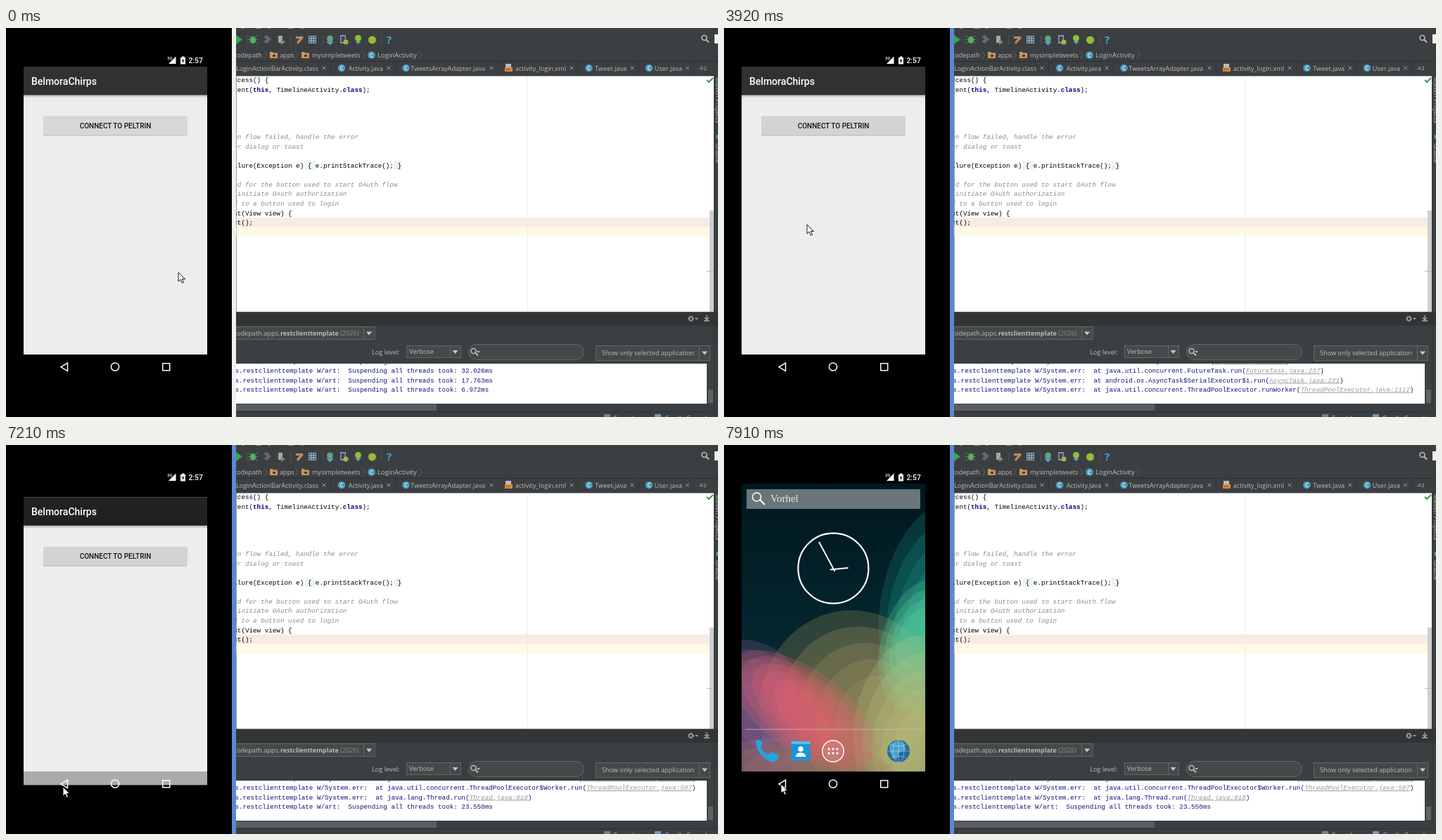
Write an HTML page that moves like this. It is 1012 by 554 pixels and loops after 8 s.

```html
<!DOCTYPE html>
<html lang="en">
<head>
<meta charset="utf-8">
<title>Phone and editor</title>
<style>
  html, body { margin: 0; width: 100%; height: 100%; overflow: hidden; background: #000; }
  svg { display: block; width: 1012px; height: 554px; }
  text { white-space: pre; }
  .ui { font: 9.2px "Open Sans", sans-serif; fill: #bbb; }
  .mono { font: 9.25px "Liberation Mono", monospace; }
  .note { font-style: italic; fill: #8c8c8c; }
  .key { font-weight: bold; fill: #000080; }
  .log { fill: #12127e; }
  .link { font-style: italic; fill: #999; text-decoration: underline; }
  .phone { font-family: Roboto, sans-serif; font-weight: 500; }
  .line { fill: none; stroke: #fff; }
</style>
</head>
<body>
<svg id="stage" viewBox="0 0 1012 554"></svg>
<script>
const rect = (x, y, w, h, fill, extra = '') =>
  `<rect x="${x}" y="${y}" width="${w}" height="${h}" fill="${fill}" ${extra}/>`;
const circle = (x, y, r, fill, extra = '') =>
  `<circle cx="${x}" cy="${y}" r="${r}" fill="${fill}" ${extra}/>`;
const path = (d, extra = '') => `<path d="${d}" ${extra}/>`;
const text = (x, y, s, cls = 'ui', extra = '') =>
  `<text x="${x}" y="${y}" class="${cls}" ${extra}>${s}</text>`;
const span = (cls, s) => `<tspan class="${cls}">${s}</tspan>`;
const repeat = (n, f) => Array.from({ length: n }, (_, i) => f(i)).join('');

// Editor window
const classIcon = (x, y) => circle(x, y, 5.3, '#4a9cc0') +
  text(x, y + 3, 'C', 'ui', 'text-anchor="middle" style="font-size:8px;font-weight:600;fill:#e8f4fa"');
const folder = x => path(`M${x} 34h4l1 1.5h6v7.500h-11z`, 'fill="#c9975a"') + rect(x + 4, 38, 4, 3, '#4f3d2a');
const chevron = x => path(`M${x} 33l4 5.500l-4 5.500`, 'fill="none" stroke="#5d6062"');
const close = x => path(`M${x - 2.5} 54.500l5 5m0 -5l-5 5`, 'stroke="#9a9c9d"');
const arrow = (x, y) => path(`M${x - 4} ${y - 2}h8l-4 5z`, 'fill="#c8c8c8"');
const lens = (x, y) => circle(x, y, 3.5, 'none', 'stroke="#bbb" stroke-width="1.6"') +
  path(`M${x + 2.5} ${y + 2.5}l4 4`, 'stroke="#bbb" stroke-width="2"');
const box = (x, y, w, h, r = 0) => rect(x, y, w, h, '#45494a', `stroke="#646769" rx="${r}"`);

const toolbar = () =>
  path('M327 10l9 6.500l-9 6.500z', 'fill="#34a853"') +
  path('M345 11l12 11m0-11l-12 11m-1-5.500h14', 'stroke="#4f9a52"') +
  `<ellipse cx="351" cy="17" rx="4" ry="5" fill="#59b05c"/>` +
  path('M366 12l5-2l6 6l-6 6l-5-2l4-4z', 'fill="#66696b"') +
  rect(387, 11, 6, 10, '#a5a8aa') + path('M391 16l6 4l-6 4z', 'fill="#5aa55c"') +
  path('M412 12h7v3h-7zM420 11l3 3l-8 9l-2-2z', 'fill="#c08a5a"') +
  rect(430, 11, 11, 11, '#8fa9ba') + repeat(9, i => rect(431 + i % 3 * 3.5, 12 + (i / 3 | 0) * 3.5, 2, 2, '#3c4750')) +
  circle(460.5, 15, 4.5, '#58a85c') + path('M460.500 13v10m-4-4l4 4l4-4', 'fill="none" stroke="#5ba7d0" stroke-width="2"') +
  rect(475, 10, 8, 12, '#9b8ab0') + rect(476.5, 12, 5, 8, '#483f55') + circle(483, 20, 3.5, '#94bd3b') +
  circle(500.5, 14.5, 4.5, '#94bd3b') + path('M496.500 19h8l-4 4z', 'fill="#5ba7d0"') + circle(520.5, 17, 5.5, '#94bd3b') +
  text(541, 22, '?', 'ui', 'style="font-size:15px;font-weight:bold;fill:#4aa5d8"') +
  [342, 404, 450, 533].map(x => rect(x, 10, 1, 13, '#505355')).join('') +
  [335, 355, 372, 401, 419].map((x, i) => rect(x, 0, 4 + i % 2 * 4, 1, '#8d8f90')).join('') +
  lens(992.5, 14) + rect(1007, 9, 5, 13, '#f2f2f2');

const crumbs = () =>
  text(364, 42, 'codepath', 'ui', 'text-anchor="end"') + text(389, 42, 'apps') +
  text(435, 42, 'mysimpletweets', 'ui', 'style="font-size:9px"') +
  text(528, 42, 'LoginActivity', 'ui', 'style="font-size:9.5px"') +
  folder(375) + folder(420) + classIcon(519.5, 38.5) + [367, 411, 506, 587].map(chevron).join('');

const tabs = () => rect(327, 47, 685, 1, '#2d2f30') +
  [[444, 'LoginActionBarActivity.class', 452], [536, 'Activity.java', 544, 477], [681, 'TweetsArrayAdapter.java', 690, 568.5],
   [796, 'activity_login.xml', 804], [882, 'Tweet.java', 890, 828.5], [961, 'User.java', 968.5, 914]]
    .map(([end, name, x, icon]) => text(end, 60.5, name, 'ui', 'text-anchor="end" style="font-size:9.1px"') +
      close(x) + rect(x + 9, 48, 1, 18, '#323435') + (icon ? classIcon(icon, 57) : '')).join('') +
  rect(710, 51, 8, 9, '#b9bcbd') + rect(709, 56, 11, 6, '#d98a3a') + text(710, 61, '&lt;&gt;', 'ui', 'style="font-size:6px;fill:#333"') +
  text(984, 60, '-≡2', 'ui', 'style="font-size:8px"');

const code = () => rect(327.5, 68.5, 678.5, 336, '#fff') +
  rect(327.5, 270, 678.5, 13.5, '#faeae6') + rect(327.5, 283.5, 672.5, 13, '#fffae3') + rect(740.5, 69, 1, 335, '#ececec') +
  rect(425, 189, 15, 13, '#edf6ec') + rect(551, 189, 12, 13, '#edf6ec') +
  rect(1000, 260, 6, 144, '#cfcfcf') + rect(996, 346, 10, 1, '#e8a49c') +
  path('M996 74l3 3l6-6', 'fill="none" stroke="#3f9c46" stroke-width="2"') +
  [[77, 'ccess() {'],
   [90.5, `tent(${span('key', 'this')}, TimelineActivity.${span('key', 'class')});`],
   [158, span('note', 'on flow failed, handle the error')],
   [171.5, span('note', 'or dialog or toast')],
   [199, 'ilure(Exception e) { e.printStackTrace(); }'],
   [225.5, span('note', 'od for the button used to start OAuth flow')],
   [239, span('note', ' initiate OAuth authorization')],
   [253, span('note', 'd to a button used to login')],
   [266.5, 'st(View view) {'],
   [280, 'ct();']].map(([y, s]) => text(323.3, y, s, 'mono')).join('');

const logRows = ['41.208', '32.026', '17.763', '6.972',
  ['android.os.AsyncTask$2.call', 'AsyncTask.java:288'],
  ['java.util.concurrent.FutureTask.run', 'FutureTask.java:237'],
  ['android.os.AsyncTask$SerialExecutor$1.run', 'AsyncTask.java:231'],
  ['java.util.concurrent.ThreadPoolExecutor.runWorker', 'ThreadPoolExecutor.java:1112'],
  ['java.util.concurrent.ThreadPoolExecutor$Worker.run', 'ThreadPoolExecutor.java:587'],
  ['java.lang.Thread.run', 'Thread.java:818'], '23.550'];
const logRow = (row, i) => text(325.4, 491 + (i - 1) * 13.5, 's.restclienttemplate ' + (Array.isArray(row)
  ? `W/System.err:  at ${row[0]}(${span('link', row[1])})`
  : `W/art:  Suspending all threads took: ${row}ms`), 'mono log');

const logPanel = () => rect(327, 404.5, 685, 19.5, '#323536') +
  circle(973.5, 414, 2.8, 'none', 'stroke="#aaa" stroke-width="2.4" stroke-dasharray="1.600 .6"') + path('M979 413h5l-2.500 2.500z', 'fill="#aaa"') +
  path('M996 409v6m-3-2.500l3 3l3-3m-7 4.500h8', 'fill="none" stroke="#aaa" stroke-width="1.3"') +
  box(320, 425.5, 204, 18) + rect(508, 426, 1, 17, '#646769') + arrow(516, 434.5) +
  text(389.5, 438, 'codepath.apps.', 'ui', 'text-anchor="end"') +
  text(390, 438, 'restclienttemplate', 'ui', 'style="font-weight:bold;font-size:8.9px"') +
  text(475, 438, '(2026)', 'ui', 'style="fill:#8a8c8d"') +
  text(520, 465, 'Log level:') + box(569.5, 452.5, 77, 17) + rect(631, 453, 1, 16, '#646769') + arrow(638.5, 461) + text(573, 464, 'Verbose') +
  box(657.5, 450.5, 164, 22, 11) + lens(664.5, 460) + path('M669 460h5l-2.500 3z', 'fill="#bbb"') +
  box(838.5, 452.5, 162, 21) + rect(985, 453, 1, 20, '#646769') + arrow(993, 462.5) + text(847, 466, 'Show only selected application') +
  rect(327, 478, 669, 57, '#fff') + rect(996, 478, 10, 57, '#3f4244') + rect(998, 515, 7, 19, '#5f6264') +
  `<g clip-path="url(#logClip)"><g id="log">${logRows.map(logRow).join('')}</g></g>` +
  rect(327, 536, 285, 9, '#5a5d5f') + rect(327, 546, 685, 1, '#303233') +
  rect(850, 550, 9, 4, '#7d8082') + text(864, 559, 'Event Log') +
  rect(922, 550, 9, 4, '#6d9cc0') + text(936, 559, 'Gradle Console');

const editor = () => rect(327, 0, 685, 554, '#3c3f41') + toolbar() + crumbs() + tabs() + code() + logPanel() +
  rect(1006, 67, 1, 479, '#2f3133') + text(1009, 70, 'Maven Projects', 'ui', 'transform="rotate(90 1009 70)"') +
  circle(1013, 155, 3.5, '#59a869') + text(1009, 164, 'Gradle', 'ui', 'transform="rotate(90 1009 164)"');

// Phone
const app = () => rect(25, 55, 261, 410, '#ededed') + rect(25, 95, 261, 2.5, '#c3c3c3') + rect(25, 97.5, 261, 1.5, '#d3d3d3') +
  rect(25, 55, 261, 40.5, '#303131', 'id="bar"') +
  text(36, 80.5, 'BelmoraChirps', 'phone', 'font-size="14" fill="#fff"') +
  rect(53, 126, 204.5, 27.5, '#b9baba', 'rx="2"') + rect(53, 125.5, 204.5, 27, '#d6d7d7', 'rx="2" id="button"') +
  text(155.5, 142.5, 'CONNECT TO PELTRIN', 'phone', 'font-size="10" fill="#151515" text-anchor="middle"');

// Layered translucent petals, each smaller than the last
const petals = (n, x, y, rx, ry, turn, fill, alpha, dx = 0, dy = 0) => repeat(n, i => {
  const k = 1 - i / (n + 2);
  return `<ellipse rx="${rx * k}" ry="${ry * k}" fill="${fill}" opacity="${alpha}" transform="translate(${x + dx * i} ${y + dy * i}) rotate(${turn + i * 3})"/>`;
});

const home = () => rect(25, 20, 261, 490, 'url(#night)') +
  petals(6, 320, 250, 100, 170, 4, '#1fa598', .2, -1, 3) +
  petals(5, 185, 385, 135, 150, -8, '#a3955f', .27, 8, 2) +
  petals(4, 278, 285, 55, 95, 15, '#62dca6', .22, -1, -3) +
  petals(5, 270, 400, 85, 130, 10, '#bcc47e', .23, 2, 6) +
  petals(5, 45, 390, 85, 115, -18, '#87568c', .28, 2, -2) +
  petals(3, 110, 478, 140, 62, 4, '#a87468', .25) +
  petals(6, 112, 378, 122, 58, 36, '#e95f6e', .22, 1, 1) +
  rect(25, 465, 261, 45, '#fff', 'opacity=".13"') +
  rect(32, 63, 247, 28, '#c8cccc', 'opacity=".52" rx="1"') +
  circle(46.5, 74, 6, 'none', 'stroke="#fff" stroke-width="1.5"') + path('M51 78l7 7', 'stroke="#fff" stroke-width="2"') +
  text(66, 81, 'Vorhel', '', 'font-family="Liberation Serif, serif" font-size="15" fill="#e2e6e6"') +
  circle(155.4, 175.7, 50, 'none', 'stroke="#fff" stroke-width="2.2"') +
  path('M135 138l22.500 42M151 177.500l25.500-2.500', 'class="line" stroke-width="1.9"') +
  rect(30, 404.5, 251, 1, '#cbbcbc', 'opacity=".8"') +
  path('M47 421q5-3 8 4l-3 5q4 8 11 11l5-4q8 3 10 8q-4 7-11 6q-20-8-22-29z', 'fill="#25a4e4"') +
  rect(95.5, 422, 27, 27.5, '#1a95d6', 'rx="2"') + rect(95.5, 422, 27, 4, '#54bdf0') +
  circle(109, 433, 3.8, '#fff') + path('M101.500 444q1-6 7.500-6t7.500 6z', 'fill="#fff"') +
  circle(155, 436, 15.3, '#fff', 'fill-opacity=".12" stroke="#fff" stroke-width="1.5"') +
  repeat(6, i => rect(147.5 + i % 3 * 6, 431.5 + (i / 3 | 0) * 6, 3, 3, '#fff', 'rx="1"')) +
  circle(248, 436, 16, '#1f6d9c') + path('M235 428q9-10 21-4l3 10l-10 4l-4 10q-10-4-10-20z', 'fill="#4d9fcb"') +
  path('M232 436h32M248 420v32M236 426q12 6 24 0M236 446q12-6 24 0', 'class="line" stroke-width=".6" opacity=".6"') +
  `<ellipse cx="248" cy="436" rx="8" ry="16" class="line" stroke-width=".6" opacity=".6"/>`;

const phone = () => rect(0, 0, 321, 554, '#000') +
  `<g id="app">${app()}</g>` + rect(25, 465, 261, 45, '#000', 'opacity=".28"') +
  `<g id="home" clip-path="url(#screen)">${rect(25, 55, 261, 410, '#000')}<g id="zoom" clip-path="url(#sheet)">${home()}</g></g>` +
  text(229, 45, '3G', 'phone', 'font-size="6" fill="#fff"') + path('M231 51h10.500v-10.500z', 'fill="#fff"') +
  path('M248 42h2v-1.500h3.500v1.500h1.500v9.500h-7z', 'fill="#fff"') + path('M252.500 43l-3 4h2l-1 3.500l3-4.500h-2z') +
  text(259.5, 50, '2:57', 'phone', 'font-size="10.3" fill="#fff"') +
  rect(44, 465, 78, 35, '#fff', 'rx="17.5" id="ripple" opacity="0"') +
  path('M87.500 477v11.500l-9.500-5.700z', 'class="line" stroke-width="1.5"') + circle(155, 482.5, 5.6, 'none', 'stroke="#fff" stroke-width="1.5"') +
  rect(222.7, 477.7, 10, 10, 'none', 'stroke="#fff" stroke-width="1.5"');

const clip = (id, x, y, w, h) => `<clipPath id="${id}">${rect(x, y, w, h, '#000')}</clipPath>`;
document.getElementById('stage').innerHTML =
  `<defs>${clip('logClip', 327, 478, 669, 47)}${clip('screen', 25, 55, 261, 410)}${clip('sheet', 25, 20, 261, 490)}${clip('right', 327, 0, 685, 554)}
   <linearGradient id="night" x2="0" y2="1"><stop stop-color="#01151c"/><stop offset=".45" stop-color="#03242c"/><stop offset="1" stop-color="#123034"/></linearGradient></defs>` +
  `<g clip-path="url(#right)">${editor()}</g>` + phone() + rect(321, 0, 6, 554, '#f0f0f0', 'id="divider"') +
  path('M0 0v13l3-2.800l2.300 5l2.200-1l-2.300-4.700h4.300z', 'id="cursor" fill="#fff" stroke="#000" stroke-width=".9"');

// Each track holds [time, ...values]; a value stays until the next time.
const tracks = {
  cursor: [[0, 245, 348], [130, 251, 340], [280, 270, 316], [430, 288, 276], [580, 279, 226], [730, 235, 170], [890, 191, 136],
    [1040, 244, 184], [1190, 208, 154], [1320, 179, 134], [1590, 178, 133],
    [3560, 168, 150], [3720, 146, 204], [3880, 118, 280], [4040, 91, 350], [4190, 76, 399],
    [4460, 61, 437], [4600, 63, 452], [4730, 69, 466], [4860, 75, 477], [5000, 80, 485], [5130, 81, 487], [7640, 81, 485], [7780, 81, 483]],
  divider: [[0, '#f0f0f0'], [1900, '#5b87d3']],
  button: [[0, '#d6d7d7'], [2320, '#cbcccc'], [2450, '#c3c4c4'], [2730, '#c7c8c8'], [2860, '#cdcece'], [3000, '#d2d3d3']],
  log: [[0, 0], [3720, 2], [3880, 4], [4040, 6], [4600, 6.4], [4730, 6.7], [4860, 6.85], [5000, 7]],
  ripple: [[0, 0], [5960, .12], [6110, .22], [6640, .15], [6790, .07], [6940, 0]],
  app: [[0, 0, 1], [7210, 19.3, 1], [7350, 34, .3], [7500, 37, 0]],
  home: [[0, .9, 0], [7350, .91, .25], [7500, .9346, .64], [7640, .97, .84], [7780, .99, .95], [7910, 1, 1]],
};
const nodes = Object.fromEntries(['cursor', 'divider', 'button', 'log', 'ripple', 'app', 'home', 'bar', 'zoom']
  .map(id => [id, document.getElementById(id)]));
const at = (name, t) => tracks[name].findLast(key => key[0] <= t).slice(1);
const set = (id, attr, value) => nodes[id].setAttribute(attr, value);

function draw(now) {
  const t = now % 8000;
  set('cursor', 'transform', `translate(${at('cursor', t)})`);
  set('divider', 'fill', at('divider', t));
  set('button', 'fill', at('button', t));
  set('log', 'transform', `translate(0 ${-13.5 * at('log', t)})`);
  set('ripple', 'opacity', at('ripple', t));

  const [slide, appAlpha] = at('app', t), [scale, light] = at('home', t);
  set('app', 'transform', `translate(0 ${slide})`);
  set('app', 'opacity', appAlpha);
  set('bar', 'fill', slide ? '#212121' : '#303131');
  set('home', 'visibility', light ? 'visible' : 'hidden');
  set('home', 'opacity', 1 - appAlpha);
  set('zoom', 'transform', `translate(155.5 252) scale(${scale}) translate(-155.5 -252)`);
  set('zoom', 'opacity', light);
  requestAnimationFrame(draw);
}
requestAnimationFrame(draw);
</script>
</body>
</html>
```
